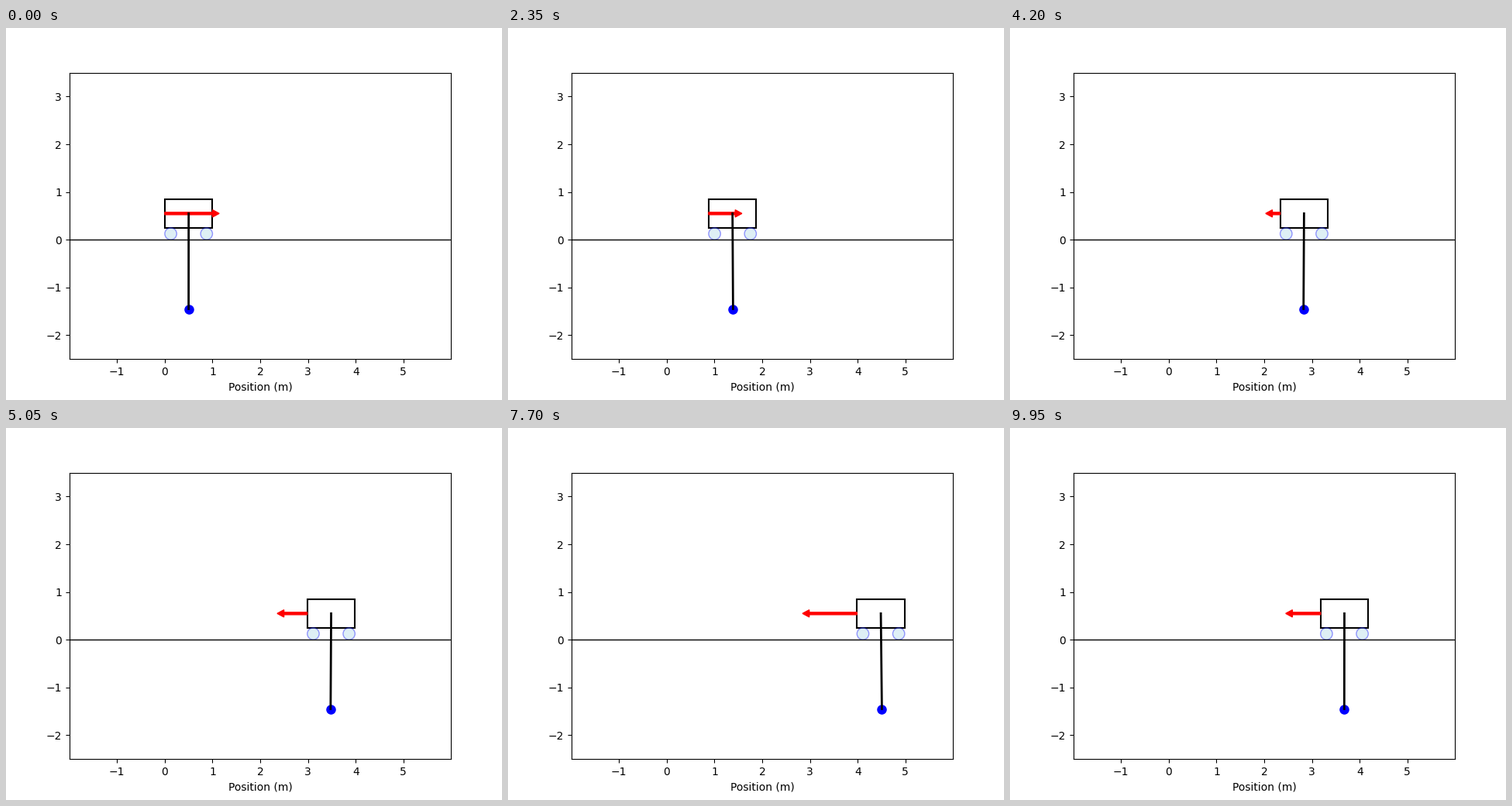
A matplotlib script that plays this animation: 640x480 px, repeating every 10 s.

```python
import numpy as np
import matplotlib.pyplot as plt
from matplotlib.animation import FuncAnimation
from matplotlib.patches import Circle, FancyArrow, Rectangle

FRAMES, STEP_MS = 200, 50
CART_MASS, BOB_MASS, GRAVITY = 1.0, 2.0, 9.81
TOTAL = CART_MASS + BOB_MASS
DRIVE = np.sqrt(1 / 6)                           # force frequency, rad/s
SWING = np.sqrt(GRAVITY * TOTAL / CART_MASS)     # pendulum frequency, rad/s
CART_W, CART_H, WHEEL_R = 1.0, 0.6, 0.125
PIVOT_Y, ROD = 0.55, 2.0


def state(i):
    """Cart position, bob offset and force for a cart pushed by a cosine force."""
    t = (i + 1) * STEP_MS / 1000
    force = np.cos(DRIVE * t)
    gain = 1 / CART_MASS / (SWING**2 - DRIVE**2)
    sway = gain * (np.cos(SWING * t) - force)
    x = (1 - force) / (TOTAL * DRIVE**2) - BOB_MASS / TOTAL * sway
    return x, sway, force


def push_arrow(x, force):
    return FancyArrow(x, PIVOT_Y, force, 0, width=0.05, head_width=0.15,
                      head_length=0.14, color="red")


fig, ax = plt.subplots(figsize=(6.4, 4.8), dpi=100)
ax.set_aspect("equal")
ax.set_xlim(-2, 6)
ax.set_ylim(-2.5, 3.5)
ax.set_xticks(range(-1, 6))
ax.set_yticks(range(-2, 4))
ax.set_xlabel("Position (m)")
ax.axhline(0, color="black", lw=1)

cart = ax.add_patch(Rectangle((0, 2 * WHEEL_R), CART_W, CART_H,
                              fill=False, ec="black", lw=1.5))
wheels = [ax.add_patch(Circle((0, WHEEL_R), WHEEL_R, fc="lightblue",
                              ec="blue", alpha=0.4)) for _ in range(2)]
arrow = ax.add_patch(push_arrow(0, 1))
bob, = ax.plot([], [], "o", color="blue", ms=8)
rod, = ax.plot([], [], color="black", lw=2)


def draw(i):
    x, sway, force = state(i)
    pivot = x + CART_W / 2
    bob_y = PIVOT_Y - np.sqrt(ROD**2 - sway**2)
    cart.set_x(x)
    wheels[0].center = x + WHEEL_R, WHEEL_R
    wheels[1].center = x + CART_W - WHEEL_R, WHEEL_R
    bob.set_data([pivot + sway], [bob_y])
    rod.set_data([pivot, pivot + sway], [PIVOT_Y, bob_y])
    arrow.set_xy(push_arrow(x, force).get_xy())
    return cart, *wheels, arrow, bob, rod


anim = FuncAnimation(fig, draw, frames=FRAMES, interval=STEP_MS,
                     init_func=lambda: draw(0), repeat=True, repeat_delay=0)
plt.show()
```
